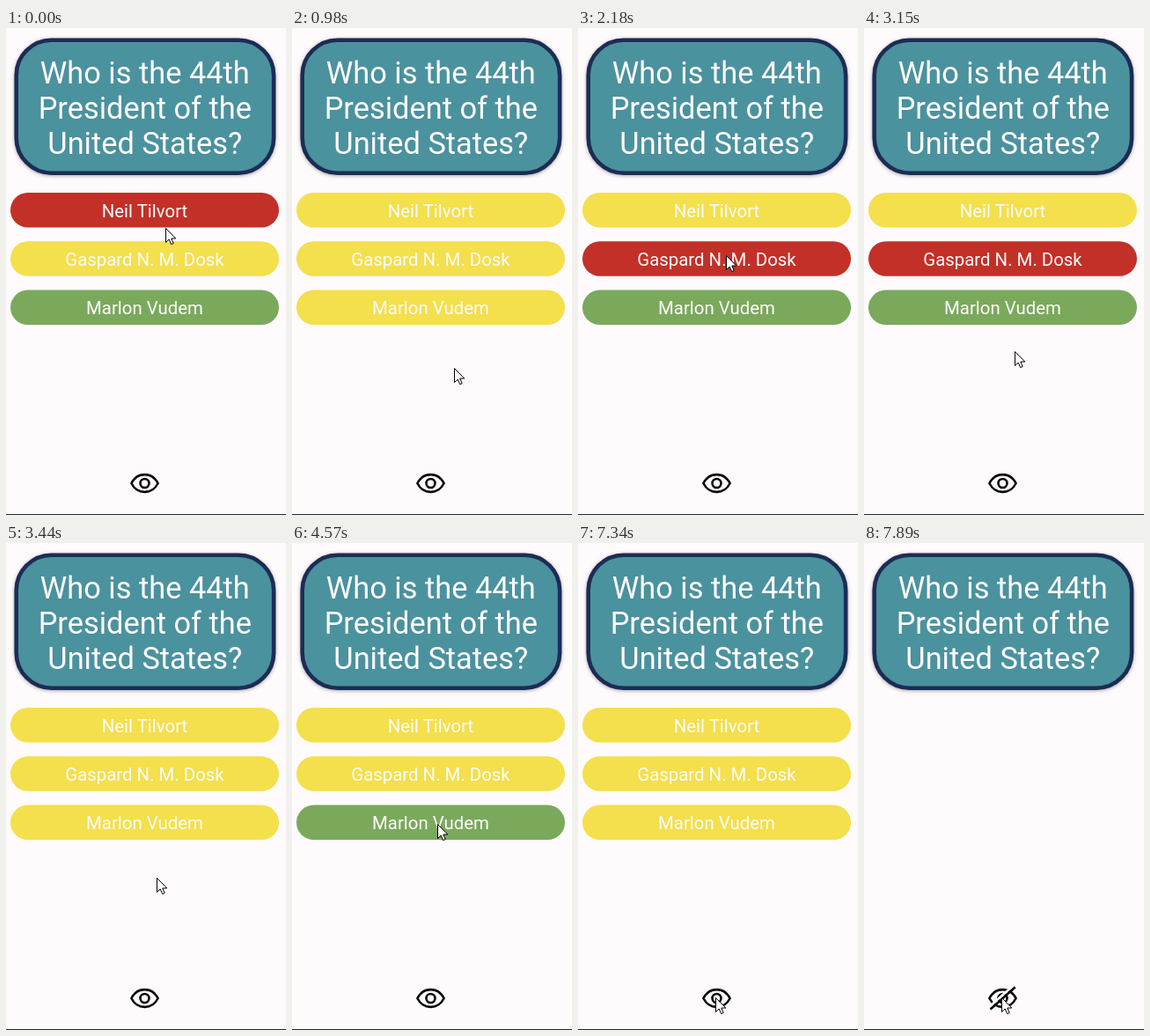
Animation, 318 px wide and 553 px high, one loop 8000 ms. Source, as an HTML page:

```html
<!DOCTYPE html>
<html lang="en">
<head>
<meta charset="utf-8">
<title>Quiz</title>
<style>
  html, body { margin: 0; width: 100%; height: 100%; overflow: hidden; background: #fffbfc; }
  svg { display: block; }
  text { font-family: Roboto, sans-serif; fill: #fffbfc; text-anchor: middle; }
  .card { fill: #4a929e; stroke: #1c2c55; stroke-width: 4.6; filter: drop-shadow(0 1px 2px #0005); }
  .question { font-size: 34.4px; }
  .answer { font-size: 20.4px; }
  .icon { fill: none; stroke: #0a0a0a; stroke-width: 2.6; }
  .gap { stroke: #fffbfc; }
</style>
</head>
<body>
<svg width="318" height="553" viewBox="0 0 318 553">
  <rect class="card" x="11.7" y="13.7" width="292.4" height="151" rx="40"/>
  <g class="question">
    <text x="157.8" y="62.7">Who is the 44th</text>
    <text x="157.8" y="103">President of the</text>
    <text x="157.8" y="143.3">United States?</text>
  </g>
  <g id="answers"></g>
  <g class="icon">
    <path d="M142.4 517C145.5 511 151 507.1 157.5 507.1S169.5 511 172.6 517C169.5 523 164 526.9 157.5 526.9S145.5 523 142.4 517Z"/>
    <circle cx="157.5" cy="517" r="5"/>
    <g id="slash">
      <path class="gap" d="M141.5 527.5L169.5 502.5"/>
      <path d="M143.5 529.5L171.8 504.3"/>
    </g>
  </g>
  <rect y="552" width="318" height="1" fill="#2b292b"/>
  <path id="cursor" d="M.5 .5V16.5L4.2 13L6.7 18.6L9.2 17.5L6.8 12H11.8Z" fill="#fff" stroke="#000"/>
</svg>
<script>
const LOOP = 8000;
const RED = '#c33027', YELLOW = '#f4df4c', GREEN = '#7aa95c';
const names = ['Neil Tilvort', 'Gaspard N. M. Dosk', 'Marlon Vudem'];
const correct = 2;

// Chosen answer from each moment on; null means unanswered.
const choices = [[0, 0], [980, null], [2180, 1], [3440, null], [4570, 2], [6190, null]];
const hideAt = 7620;

// Pointer moves: first tick, last tick, number of ticks, destination.
const startPoint = [181, 227];
const moves = [
  [120, 700, 5, 184, 386],
  [1130, 1880, 6, 168, 258],
  [2700, 3290, 5, 171, 380],
  [3860, 4160, 3, 165, 319],
  [5590, 5890, 3, 166, 363],
  [6330, 7040, 6, 157, 522],
  [7190, 7190, 1, 157, 517],
  [7340, 7340, 1, 156, 516],
];

const byId = id => document.getElementById(id);
const answers = byId('answers'), slash = byId('slash'), cursor = byId('cursor');

answers.innerHTML = names.map((name, i) => {
  const y = 187 + i * 55.3;
  return `<rect x="5" y="${y}" width="305" height="39.5" rx="19.75"/>
    <text class="answer" x="157.5" y="${y + 27.7}">${name}</text>`;
}).join('');
const pills = answers.querySelectorAll('rect');

const smooth = p => p * p * (3 - 2 * p);

function pointerAt(t) {
  let [x, y] = startPoint;
  for (const [from, to, ticks, toX, toY] of moves) {
    if (t < from) break;
    const interval = (to - from) / (ticks - 1) || 1;
    const tick = Math.min(ticks, Math.floor((t - from) / interval + 1e-6) + 1);
    const p = smooth(tick / ticks);
    x += (toX - x) * p;
    y += (toY - y) * p;
  }
  return [Math.round(x), Math.round(y)];
}

function pillColor(i, choice) {
  if (choice === null) return YELLOW;
  if (i === correct) return GREEN;
  return i === choice ? RED : YELLOW;
}

function draw(t) {
  const choice = choices.filter(([at]) => at <= t).pop()[1];
  pills.forEach((pill, i) => pill.setAttribute('fill', pillColor(i, choice)));
  const hidden = t >= hideAt;
  answers.style.display = hidden ? 'none' : '';
  slash.style.display = hidden ? '' : 'none';
  cursor.setAttribute('transform', `translate(${pointerAt(t)})`);
}

function frame() {
  draw(performance.now() % LOOP);
  requestAnimationFrame(frame);
}
frame();
</script>
</body>
</html>
```
